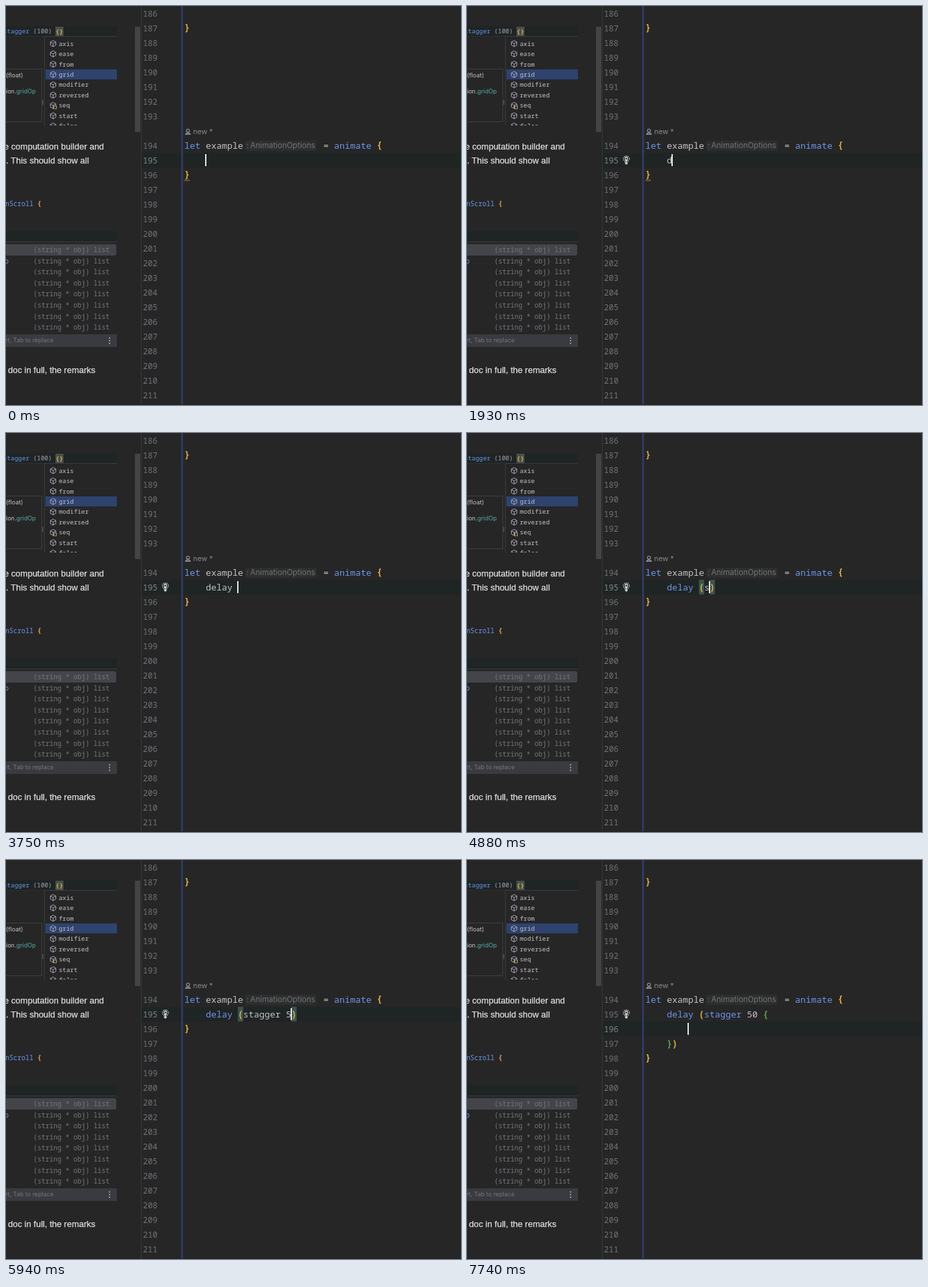
An HTML page that plays this animation: 681 px wide and 598 px high, repeating every 8 s.

```html
<!DOCTYPE html>
<html lang="en">
<head>
<meta charset="utf-8">
<title>Typing in a code editor</title>
<style>
html, body { margin: 0; width: 100%; height: 100%; overflow: hidden; background: #262626; }
svg { display: block; width: 681px; height: 598px; }
text { white-space: pre; }
.code { font: 13.333px "Noto Sans Mono", "DejaVu Sans Mono", monospace; }
.num { font: 12px "Noto Sans Mono", "DejaVu Sans Mono", monospace; fill: #6f737a; }
.small { font: 9.33px "Noto Sans Mono", "DejaVu Sans Mono", monospace; }
.mid { font: 10px "Noto Sans Mono", "DejaVu Sans Mono", monospace; }
.ui { font-family: Inter, "Open Sans", sans-serif; }
.prose { font: 13px "Liberation Sans", Arial, sans-serif; fill: #e0e0e0; stroke: #e0e0e0; stroke-width: .25px; }
.plain { fill: #c4c4c4; }
.blue { fill: #6c95eb; }
.gold { fill: #e3ab42; }
.yellow { fill: #d0bb40; }
.green { fill: #5f9f50; }
.gold, .yellow, .green { font-weight: 600; }
.digit { fill: #cbbfcf; }
.match { fill: #39524e; }
.wave { fill: none; stroke: #c47d3c; stroke-width: 1; }
</style>
</head>
<body>
<svg viewBox="0 0 681 598" xmlns="http://www.w3.org/2000/svg">
  <defs>
    <clipPath id="shot"><rect y="28" width="166" height="151"/></clipPath>
    <g id="cube" fill="none" stroke="#aaa2ba" stroke-width="1">
      <path d="M0-4.6 4.1-2.3V2.3L0 4.6-4.1 2.3V-2.3ZM-4.1-2.3 0 0 4.1-2.3M0 0V4.6"/>
    </g>
  </defs>
  <rect width="681" height="598" fill="#262626"/>

  <g clip-path="url(#shot)">
    <rect y="30" width="166" height="15" fill="#1f2424"/>
    <rect y="45" width="57" height="1" fill="#2d3032"/>
    <rect x="57" y="45" width="109" height="1" fill="#3a3c40"/>
    <rect x="74" y="31" width="12" height="14" fill="#47504d"/>
    <g class="small">
      <text x="-4.1" y="41" class="blue">stagger</text>
      <text x="40.7" y="41" fill="#a79fb2">(100)</text>
      <text x="74.3" y="41" class="gold">{}</text>
    </g>
    <rect x="-2" y="94.5" width="55.5" height="79" fill="#262626" stroke="#3d3f43"/>
    <g class="ui" font-size="9">
      <text x="0" y="107" fill="#c4c4c4">(float)</text>
      <text x="0" y="131" fill="#c4c4c4">ion.<tspan fill="#55a9a4">gridOp</tspan></text>
    </g>
    <rect x="54" y="141" width="2" height="7" fill="#46484b"/>
    <path d="M57.5 46V179" stroke="#3a3c40"/>
    <rect x="59" y="95" width="107" height="15" fill="#2e436e"/>
    <g id="menu" class="small plain"></g>
  </g>

  <g class="prose">
    <text x="-3" y="215">e computation builder and</text>
    <text x="0" y="236">. This should show all</text>
    <text x="3" y="550">doc in full, the remarks</text>
  </g>

  <text class="mid blue" x="-1" y="299.5">nScroll <tspan class="gold">{</tspan></text>
  <rect y="337" width="166" height="16" fill="#1f2424"/>
  <rect y="353" width="166" height="1" fill="#3a3c40"/>
  <rect x="-5" y="357" width="170" height="17" rx="3" fill="#43454a"/>
  <g id="types" class="mid" fill="#73767c"></g>
  <text class="mid blue" x="-2" y="385.5">o</text>
  <rect y="492" width="166" height="19" fill="#393b40"/>
  <text class="ui" x="-1" y="504" font-size="9" fill="#73767c">rt, Tab to replace</text>
  <g fill="#b4b6ba"><circle cx="155" cy="497.5" r="1"/><circle cx="155" cy="501.5" r="1"/><circle cx="155" cy="505.5" r="1"/></g>

  <rect x="193" y="31" width="8" height="158" fill="#434446"/>
  <rect x="202" width="1" height="598" fill="#36383b"/>
  <rect id="line" x="203" width="478" height="22" fill="#1f2424"/>
  <rect x="262" width="3" height="598" fill="#2d3a63"/>
  <g id="nums"></g>

  <g fill="none" stroke="#93969c" stroke-width="1.2">
    <circle cx="272.3" cy="186.8" r="2.3"/>
    <path d="M268.8 192.4C268.8 189.6 275.8 189.6 275.8 192.4Z"/>
  </g>
  <text class="ui" x="280" y="192" font-size="10.8" fill="#878a90">new *</text>

  <rect x="358" y="202" width="107" height="15" rx="3" fill="#2d2e2e"/>
  <text class="ui" x="360" y="213" font-size="11.6" fill="#70747a">:</text>
  <text class="ui" x="365.5" y="213" font-size="11.6" fill="#70747a">AnimationOptions</text>
  <g class="code">
    <text x="267" y="37" class="gold">}</text>
    <text x="267" y="214" class="blue">let</text>
    <text x="299" y="214" class="plain">example</text>
    <text x="475" y="214" class="plain">=</text>
    <text x="491" y="214" class="blue">animate</text>
    <text x="555" y="213" class="gold">{</text>
  </g>

  <g id="bulb" fill="#c9cbce">
    <circle cx="238.5" cy="229" r="4.4" fill="none" stroke="#c9cbce" stroke-width="1.4" stroke-dasharray="1.4 1.36"/>
    <path d="M236 228A2.5 2.5 0 0 1 241 228L240 233H237ZM236.5 234H240.5V236L239.5 237.5H237.5L236.5 236Z"/>
    <circle cx="238.5" cy="228.6" r="1.2" fill="#1f2424"/>
  </g>
  <g id="live" class="code"></g>
  <rect id="caret" width="2" height="18" fill="#e6e6e6"/>
  <rect y="597" width="681" height="1" fill="#1f2021"/>
</svg>
<script>
const LOOP = 8000, LEFT = 267, CELL = 8, ROW = 22;
const $ = id => document.getElementById(id);
const label = (x, y, cls, str) => `<text x="${x}" y="${y}" class="${cls}">${str}</text>`;
const colX = col => LEFT + CELL * col;
const baseY = row => 16 + ROW * row;

$('menu').innerHTML = ['axis', 'ease', 'from', 'grid', 'modifier', 'reversed', 'seq', 'start', 'false']
  .map((name, i) => {
    const y = 56.3 + 15.45 * i;
    const lock = name === 'seq' ? `<rect x="71.5" y="${y + 1}" width="4" height="4" fill="#262626" stroke="#b39c62"/>` : '';
    return `<use href="#cube" x="70.5" y="${y}"/>${lock}` + label(79, y + 3.3, '', name);
  }).join('');

$('types').innerHTML = Array.from({ length: 8 }, (_, i) =>
  label(41, 369 + 16.6 * i, '', '(string * obj) list')).join('');

// One row between 193 and 194 holds the author hint.
$('nums').innerHTML = Array.from({ length: 26 }, (_, i) =>
  label(205, baseY(i < 8 ? i : i + 1), 'num', 186 + i)).join('');
const nums = [...$('nums').children];

// Each step changes some fields; the rest carry over.
const steps = [
  [0, { text: '', at: 0, caret: 1, warn: 1, name: 'plain', fn: 'plain', brace: 'plain', close: 'gold' }],
  [70, { bulb: 1 }],
  [870, { caret: 0 }],
  [1400, { caret: 1 }],
  [1930, { text: 'd', at: 1 }],
  [2060, { text: 'de', at: 2 }],
  [2130, { warn: 0 }],
  [2390, { text: 'del', at: 3 }],
  [2460, { text: 'dela', at: 4 }],
  [2590, { text: 'delay', at: 5 }],
  [2660, { text: 'delay ', at: 6 }],
  [3080, { text: 'delay', at: 5 }],
  [3280, { text: 'dela', at: 4 }],
  [3420, { text: 'del', at: 3 }],
  [3540, { text: 'dela', at: 4 }],
  [3610, { text: 'delay', at: 5 }],
  [3750, { text: 'delay ', at: 6 }],
  [4280, { caret: 0 }],
  [4350, { text: 'delay ()', at: 7, caret: 1, pair: '()' }],
  [4620, { name: 'blue' }],
  ...[4880, 4960, 5080, 5210, 5350, 5480, 5610, 5740, 5940].map((t, i) =>
    [t, { text: `delay (${'stagger 5'.slice(0, i + 1)})`, at: 8 + i }]),
  [6470, { name: 'plain', error: 1 }],
  [6620, { text: 'delay (stagger 50)', at: 17, name: 'blue', error: 0 }],
  [6800, { text: 'delay (stagger 50 )', at: 18 }],
  [7000, { text: 'delay (stagger 50 {)', at: 19 }],
  [7080, { text: 'delay (stagger 50 {})', pair: '' }],
  [7130, { pair: '{}' }],
  [7330, { brace: 'green' }],
  [7590, { text: 'delay (stagger 50 {', at: 4, pair: '', split: 1 }],
  [7660, { close: 'yellow' }],
  [7740, { fn: 'blue' }]
];

const wave = (x0, x1, y) => {
  let d = `M${x0} ${y}`;
  for (let x = x0 + 2, up = 1; x <= x1; x += 2, up = !up) d += `L${x} ${up ? y - 2.5 : y}`;
  return `<path class="wave" d="${d}"/>`;
};

function paintLine(s) {
  const parts = s.text.match(/\w+|[(){}]/g) || [];
  let from = 0, out = '';
  for (const part of parts) {
    const i = s.text.indexOf(part, from);
    from = i + part.length;
    const cls = /\d/.test(part) ? 'digit'
      : /[()]/.test(part) ? 'gold'
      : /[{}]/.test(part) ? s.brace
      : i ? s.fn : s.name;
    if (s.pair && s.pair.includes(part))
      out += `<rect class="match" x="${colX(4 + i)}" y="220" width="8" height="22"/>`;
    out += label(colX(4 + i), baseY(10), cls, part);
  }
  return out;
}

function paint(s) {
  const row = s.split ? 11 : 10;
  const end = s.split ? 13 : 11;
  let out = paintLine(s);
  if (s.split)
    out += label(colX(4), baseY(12), 'green', '}') + label(colX(5), baseY(12), s.close, ')');
  out += label(LEFT, baseY(end) - 1, s.close, '}');
  if (s.warn) out += wave(267, 275, 262.5);
  if (s.error) out += wave(299, 435, 240.5);
  $('live').innerHTML = out;
  $('line').setAttribute('y', ROW * row);
  $('bulb').style.display = s.bulb ? '' : 'none';
  $('caret').style.display = s.caret ? '' : 'none';
  $('caret').setAttribute('x', colX(4 + s.at) - 1);
  $('caret').setAttribute('y', ROW * row + 2);
  nums.forEach((n, i) => n.style.fill = i === row - 1 ? '#82868d' : '');
}

let shown = -1;
const start = performance.now();
function tick() {
  const t = (performance.now() - start) % LOOP;
  const n = steps.filter(step => step[0] <= t).length;
  if (n !== shown) {
    shown = n;
    paint(Object.assign({}, ...steps.slice(0, n).map(step => step[1])));
  }
  requestAnimationFrame(tick);
}
tick();
</script>
</body>
</html>
```
